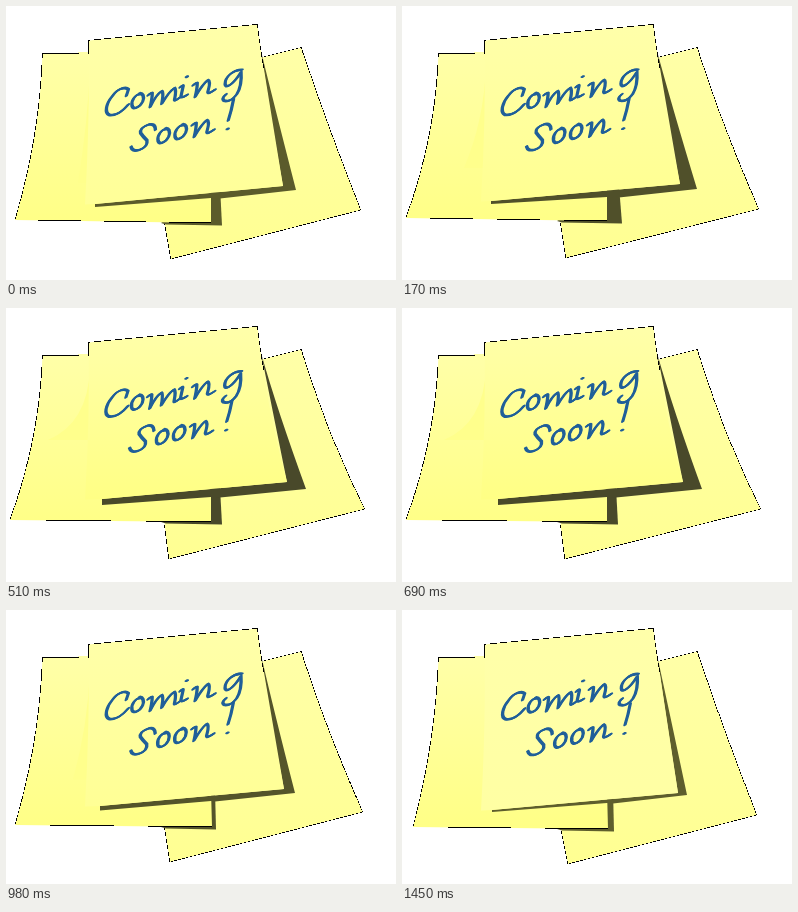
Animation, 390 px wide and 274 px high, one loop 1650 ms. Source, as an HTML page with a canvas:

```html
<!DOCTYPE html>
<html lang="en">
<head>
<meta charset="utf-8">
<title>Coming Soon!</title>
<style>
html, body { margin: 0; width: 100%; height: 100%; overflow: hidden; background: #fff; }
canvas { display: block; }
</style>
</head>
<body>
<canvas id="stage" width="390" height="274" role="img" aria-label="Coming Soon!"></canvas>
<script>
const ctx = document.getElementById('stage').getContext('2d');
const INK = '#205f99';

// Corners of each sheet as the breeze lifts it; each pose is held for `hold` ms.
const poses = [
  { hold: 170, front: [277, 180], strip: [89, 198, 201], shade: [290, 184], left: [9, 214], leftEnd: [205, 217], cast: [214, 216], right: [355, 204], rightLow: [165, 253], dark: '#5b5b2b' },
  { hold: 170, front: [278, 178], strip: [89, 195, 198], shade: [295, 183], left: [4, 212], leftEnd: [205, 215], cast: [217, 220], right: [357, 203], rightLow: [164, 252], dark: '#50502a' },
  { hold: 170, front: [280, 175], strip: [92, 192, 197], shade: [299, 182], left: [2, 211], leftEnd: [205, 214], cast: [217, 220], right: [358, 202], rightLow: [163, 251], dark: '#4c4c2a' },
  { hold: 300, front: [281, 174], strip: [96, 191, 197], shade: [300, 181], left: [4, 212], leftEnd: [205, 214], cast: [214, 216], right: [359, 201], rightLow: [163, 251], dark: '#49492a' },
  { hold: 170, front: [280, 177], strip: [97, 193, 198.5], shade: [295, 181], left: [6, 213], leftEnd: [205, 215], cast: [211, 211], right: [360, 201], rightLow: [163, 250], dark: '#4a4a29' },
  { hold: 170, front: [278, 179], strip: [94, 196, 200.5], shade: [289, 183], left: [9, 215], leftEnd: [206, 217], cast: [209, 210], right: [357, 202], rightLow: [164, 252], dark: '#54542a' },
  { hold: 500, front: [276, 183], strip: [90, 200, 202], shade: [285, 185], left: [11, 217], leftEnd: [206, 219], cast: [211, 212], right: [355, 205], rightLow: [166, 254], dark: '#5e5e2d' }
];
const LOOP = poses.reduce((sum, pose) => sum + pose.hold, 0);

// Pen strokes, relative to the lower left of each letter.
const glyphs = {
  C: 'M22-19L24-25C21-28 14-26 9-19C3-12 1-3 6-1C12 0 19-5 24-11',
  o: 'M9-14C4-14 0-8 1-3C2 1 8-1 11-7C13-12 11-15 8-15',
  m: 'M0-11Q3-14 4-13Q4-8 2 0Q8-12 13-15Q15-14 13-3Q20-15 25-18Q27-16 25-7Q25-5 30-9',
  i: 'M0-11Q3-14 3-12L1-3Q1 0 7-4M6-21l1 0',
  n: 'M0-11Q3-14 4-13Q4-8 2 0Q9-12 14-16Q17-15 14-5Q14-2 21-7',
  g: 'M18-18C11-19 2-12 2-5C2 0 9-3 17-16Q18-3 13 5Q7 13 1 11Q-2 9 3 5',
  S: 'M24-21Q24-27 18-26Q9-23 10-18Q12-15 16-11Q17-5 9-2Q2 0 1-5',
  '!': 'M9-29Q7-18 4-9M3-1l1 0'
};
for (const key in glyphs) glyphs[key] = new Path2D(glyphs[key]);

const coming = [['C', 97, 110], ['o', 125, 103], ['m', 142, 101], ['i', 174, 93], ['n', 187, 91], ['g', 217, 83]];
const soon = [['S', 124, 146], ['o', 151, 138], ['o', 168, 134], ['n', 186, 131], ['!', 218, 124]];

// Points of two numbers are lines, points of four are quadratic curves.
function trace(points) {
  const path = new Path2D();
  points.forEach((p, i) => {
    if (!i) path.moveTo(...p);
    else if (p.length === 4) path.quadraticCurveTo(...p);
    else path.lineTo(...p);
  });
  return path;
}

function fill(points, color) {
  ctx.fillStyle = color;
  ctx.fill(trace(points));
}

// One crisp pixel wide, broken wherever the paper covers most of the pixel.
function pixelLine([x0, y0], [x1, y1]) {
  const steps = Math.ceil(Math.max(Math.abs(x1 - x0), Math.abs(y1 - y0)));
  const flat = Math.abs(x1 - x0) > Math.abs(y1 - y0);
  for (let i = 0; i < steps; i++) {
    const x = x0 + (x1 - x0) * i / steps;
    const y = y0 + (y1 - y0) * i / steps;
    const minor = flat ? y : x;
    if (minor - Math.floor(minor) > 0.35) ctx.fillRect(Math.floor(x), Math.floor(y), 1, 1);
  }
}

function outline(points) {
  ctx.fillStyle = '#000';
  let from = points[0];
  for (const [x, y, endX, endY] of points.slice(1)) {
    if (endX === undefined) {
      pixelLine(from, [x, y]);
      from = [x, y];
      continue;
    }
    const [x0, y0] = from;
    for (let i = 1; i <= 16; i++) {
      const t = i / 16, u = 1 - t;
      const to = [u * u * x0 + 2 * u * t * x + t * t * endX, u * u * y0 + 2 * u * t * y + t * t * endY];
      pixelLine(from, to);
      from = to;
    }
  }
}

function paper(top, bottom, blueTop, blueBottom) {
  const g = ctx.createLinearGradient(0, top, 0, bottom);
  g.addColorStop(0, `rgb(255,255,${blueTop})`);
  g.addColorStop(1, `rgb(255,255,${blueBottom})`);
  return g;
}

function write(word, dx, dy) {
  ctx.strokeStyle = INK;
  ctx.lineWidth = 1.7;
  ctx.lineCap = ctx.lineJoin = 'round';
  for (const [letter, x, y] of word) {
    for (const nib of [-1, 0, 1]) {
      ctx.save();
      ctx.translate(x + dx + nib * 0.8, y + dy - nib * 0.5);
      ctx.scale(1.06, 1.06);
      ctx.stroke(glyphs[letter]);
      ctx.restore();
    }
  }
}

function drawRight({ right, rightLow }) {
  const sway = right[0] - 355;
  const edge = [[255.5, 51.5], [295.5, 41.5], [319 + sway * 0.5, 113 + sway * 3, ...right], rightLow, [158.5, 216]];
  fill([...edge, [200, 120]], paper(40, 254, 168, 146));
  outline(edge);
}

function drawLeft({ left, leftEnd, cast, dark }, lift) {
  const y = leftEnd[1];
  fill([[155, y], [cast[0] - 9, 180], [cast[0], 180], [cast[1], y + 2.5], [160, y + 1.5]], dark);
  const edge = [[72, 47.5], [36.5, 47.5], [34, 130, ...left], leftEnd];
  fill([[83, 46], [72, 46], ...edge, [205, 180], [205, 100]], paper(47, 218, 168, 134));
  outline(edge);
  const curlY = 177 - lift * 30;
  fill([[84, 60], [82, 115, 72 - lift * 20, curlY], [84, curlY]], '#ffff8c');
}

function drawFront({ front, strip, shade, cast, dark }, lift) {
  const [x, y, low] = strip;
  const spread = shade[0] - front[0];
  fill([[255, 45], [264 + spread * 0.38, 102, ...shade], [cast[0], shade[1] + 8.5], [205, shade[1] + 8], [x, low], [x, y], front], dark);
  fill([[82.5, 34.5], [251.5, 18.5], [261 - lift, 94, ...front], [x, y], [79, y + 0.5], [84, 110, 82.5, 34.5]],
    paper(18, 200, 170, 152 - lift * 14));
  outline([[82.5, 47], [82.5, 34.5], [251.5, 18.5], [255, 46, 258, 62]]);
  write(coming, -lift * 0.3, -lift * 0.3);
  write(soon, -lift, -lift * 0.6);
}

function poseAt(time) {
  let t = time % LOOP;
  return poses.find(pose => (t -= pose.hold) < 0) || poses[0];
}

const start = performance.now();
function render() {
  const pose = poseAt(performance.now() - start);
  const lift = (180 - pose.front[1]) / 4;
  ctx.fillStyle = '#fff';
  ctx.fillRect(0, 0, 390, 274);
  drawRight(pose);
  drawLeft(pose, lift);
  drawFront(pose, lift);
  requestAnimationFrame(render);
}
render();
</script>
</body>
</html>
```
